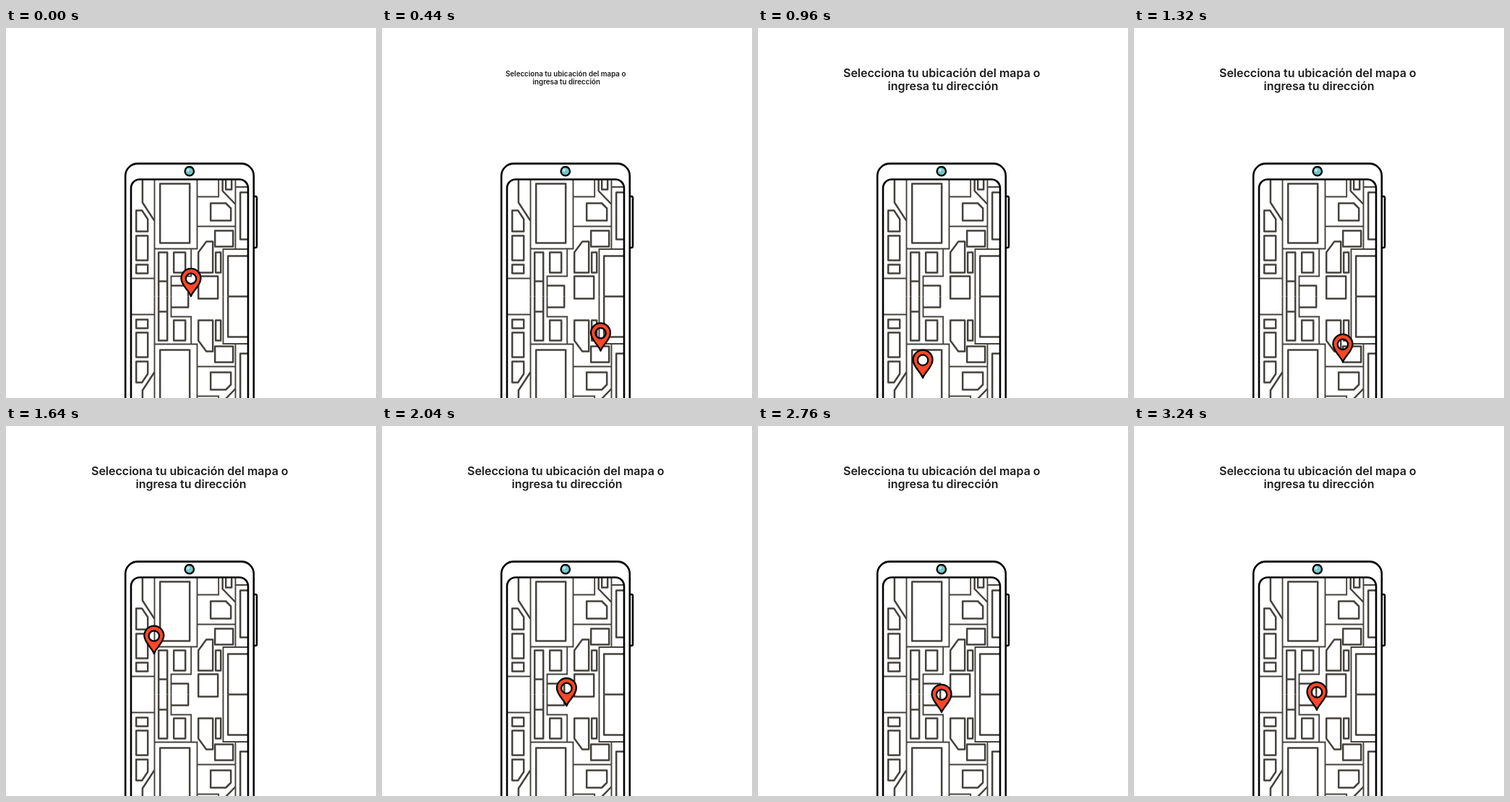
An HTML page for the animation above (3.84 s loop, 512x512 px).

```html
<!DOCTYPE html>
<html lang="es">
<head>
<meta charset="utf-8">
<title>Selecciona tu ubicación</title>
<style>
  html, body { margin: 0; width: 100%; height: 100%; overflow: hidden; background: #fff; }
  svg { display: block; width: 100vw; height: 100vh; }
  text { font: 600 16px Inter, "Open Sans", sans-serif; text-anchor: middle; fill: #1c1c1c; }
  .road { fill: none; stroke: #45423d; stroke-width: 1.9; }
  .block { fill: none; stroke: #45423d; stroke-width: 2.5; stroke-linejoin: round; }
  .ink { fill: none; stroke: #000; stroke-width: 2.6; }
</style>
</head>
<body>
<svg viewBox="0 0 512 512">
  <defs>
    <clipPath id="screen"><rect x="173" y="209.5" width="162" height="330" rx="12"/></clipPath>
    <!-- Upper half of the map; the lower half mirrors it around y = 371 -->
    <g id="half">
      <path class="road" d="M205.3 208V371 M264.3 208V305H205 M173 346H205
        M264 233H294V208 M264 274H317 M317.3 208V305.5 M317 219.5H335
        M335 305.5H300.3V371 M256 305V343H228.3V371"/>
      <path class="block" d="M188.7 208V241L205 266 M299.5 208V225L317 243
        M304 208V223H312V208
        M213 215H254V297H213Z M180 252H188L196 264V281H180Z
        M180 287H196V321H180Z M180 327H196V339H180Z
        M283 242H304L311 249V266H283Z M289 280H314V302H289Z
        M336 227H324V292H336 M336 315H307V371
        M211 371V310H223V371 M211 350H223 M232 310H248V338H232Z
        M266 338V310L277 295H286V338Z M290 310H297V338H290Z
        M228 356H252V371"/>
    </g>
  </defs>
  <g clip-path="url(#screen)">
    <g transform="translate(.2 .5)">
      <use href="#half"/>
      <use href="#half" transform="matrix(1 0 0 -1 0 742)"/>
      <path class="block" d="M266 343H293V374H266Z M307 371H336"/>
    </g>
  </g>
  <rect class="ink" x="173" y="209.5" width="162" height="330" rx="12"/>
  <rect class="ink" x="165.2" y="187.6" width="177.6" height="370" rx="17"/>
  <path class="ink" d="M343 233H345Q347 233 347 235V302Q347 304 345 304H343"/>
  <circle cx="253.8" cy="198.2" r="6.2" fill="#72c6c8" stroke="#000" stroke-width="2.3"/>
  <circle cx="252" cy="196.5" r="2.2" fill="#b9e6e6"/>
  <g id="title">
    <text x="254.3" y="68">Selecciona tu ubicación del mapa o</text>
    <text x="256" y="86">ingresa tu dirección</text>
  </g>
  <path id="pin" fill="#ff4726" stroke="#000" stroke-width="2.3" stroke-linejoin="round" fill-rule="evenodd"
    d="M0 .2C-3-8-13.5-15-13.5-24.6A13.5 13.5 0 0 1 13.5-24.6C13.5-15 3-8 0 .2Z
      M-7.2-24.2a7.2 7.2 0 1 0 14.4 0a7.2 7.2 0 1 0-14.4 0Z"/>
</svg>
<script>
  const LOOP = 3840, STEP = 40, END = 3240, GROW = 720;
  const title = document.getElementById('title');
  const pin = document.getElementById('pin');

  const smooth = u => u * u * (3 - 2 * u);
  // Quick start, long settling tail
  const settle = u => smooth(1 - (1 - u) ** 2);

  // Time, x and y of the pin's tip, easing towards that point
  const stops = [
    [0, 256, 371],
    [580, 310.5, 459.5, smooth],
    [870, 203, 478, smooth],
    [1160, 312.5, 503.3, smooth],
    [1700, 201, 308, smooth],
    [2280, 260, 393.8, settle],
    [2520, 257, 406, smooth],
    [2790, 254, 395.6, smooth],
    [3010, 253.6, 404, smooth],
    [END, 253, 392.6, smooth]
  ];

  function tipAt(t) {
    const i = Math.max(1, stops.findIndex(s => s[0] >= t));
    const [t0, x0, y0] = stops[i - 1];
    const [t1, x1, y1, ease] = stops[i];
    const p = ease((t - t0) / (t1 - t0));
    return [x0 + (x1 - x0) * p, y0 + (y1 - y0) * p];
  }

  function draw(now) {
    const t = Math.min(END, Math.floor((now % LOOP) / STEP) * STEP);
    const size = Math.min(1, t / GROW);
    title.setAttribute('transform', `translate(254 65) scale(${size}) translate(-254 -65)`);
    title.setAttribute('visibility', size ? 'visible' : 'hidden');
    pin.setAttribute('transform', `translate(${tipAt(t)})`);
  }

  const start = performance.now();
  function tick() {
    draw(performance.now() - start);
    requestAnimationFrame(tick);
  }
  tick();
</script>
</body>
</html>
```
